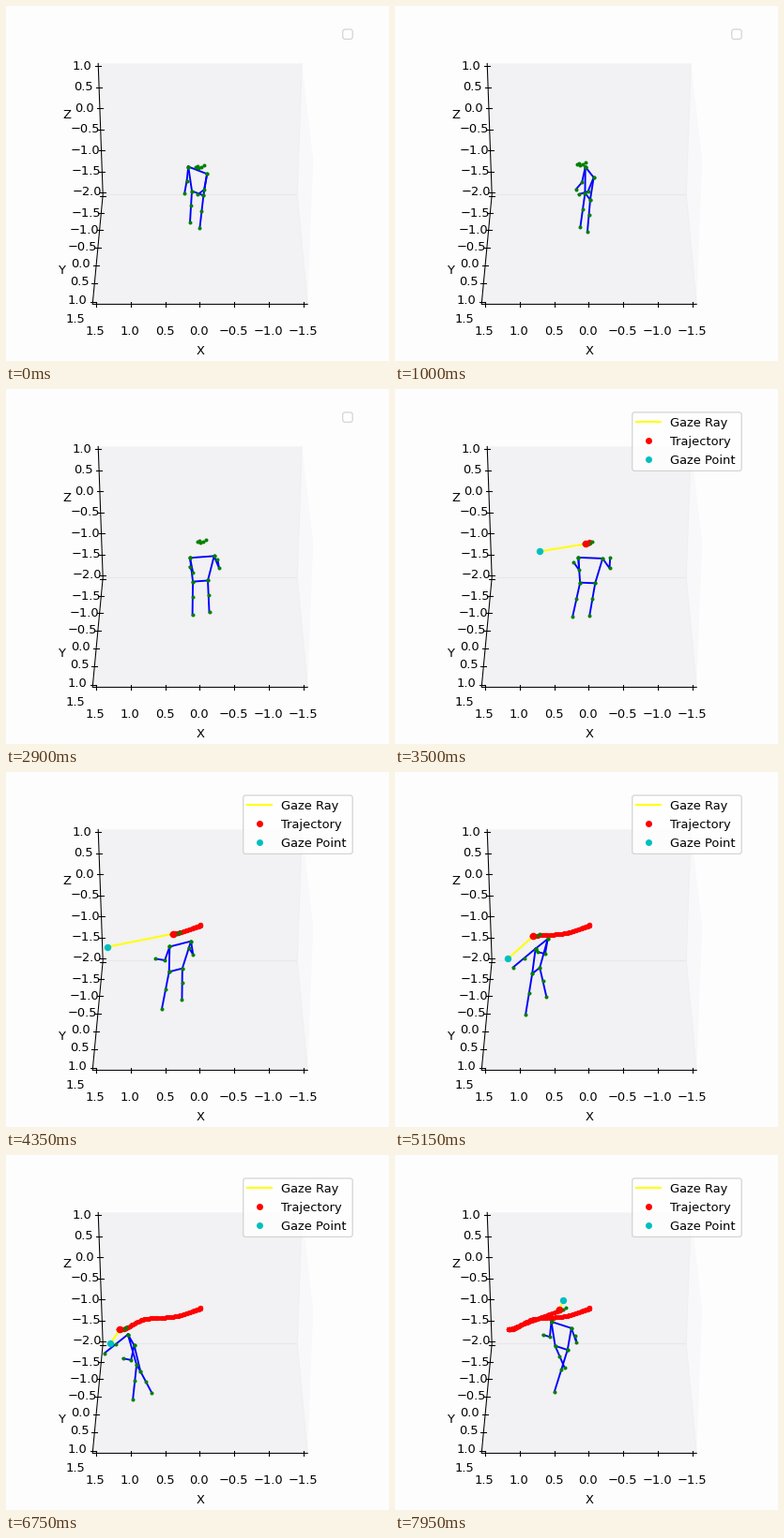
Write a matplotlib script that moves like this. It is 408x379 px and loops after 8000 ms.

```python
import numpy as np
import matplotlib.pyplot as plt
from matplotlib.animation import FuncAnimation
from matplotlib.patches import FancyBboxPatch, Polygon

W, H = 408, 379
STEP, FRAMES = 50, 160
PX = 0.72                      # points per pixel at 100 dpi
GAZE_ON = 3000

plt.rcParams["font.family"] = "DejaVu Sans"
fig = plt.figure(figsize=(W / 100, H / 100), dpi=100, facecolor="#fefdfe")
ax = fig.add_axes([0, 0, 1, 1])
ax.set_xlim(0.8, W + 0.8)
ax.set_ylim(H + 0.6, 0.6)
ax.axis("off")


def label(x, y, text, ha="center", **kw):
    return ax.text(x, y + 4.7, text, ha=ha, va="baseline",
                   fontsize=13 * PX, color="black", **kw)


def stroke(points, color="black", width=1.05, z=2):
    xs, ys = zip(*points)
    return ax.plot(xs, ys, color=color, lw=width * PX, zorder=z)[0]


def dots(color, size, z, points=((), ())):
    return ax.plot(*points, "o", color=color, ms=size * PX, mew=0, zorder=z)[0]


def frame_box(x0, y0, x1, y1):
    box = FancyBboxPatch((x0, y0), x1 - x0, y1 - y0,
                         boxstyle="round,pad=0,rounding_size=2.6",
                         fc=(1, 1, 1, 0.8), ec=(0.8, 0.8, 0.8, 0.8),
                         lw=1.3 * PX, zorder=20)
    return ax.add_patch(box)


def number(v):
    return f"{v:.1f}".replace("-", "\u2212")


def draw_axes():
    tl, tr, ml, mr = (99, 62), (316, 62), (104, 202), (311, 202)
    bl, br, side = (93, 319), (322, 319), (328, 165)
    panes = [((tr, side, br, mr), "#f8f7f9"),
             ((tl, tr, mr, ml), "#f2f1f3"),
             ((ml, mr, br, bl), "#f2f1f3")]
    for pts, color in panes:
        ax.add_patch(Polygon(pts, fc=color, ec="none", zorder=1))
    stroke([ml, mr], "#e8e8e9")
    stroke([tr, mr, br], "#efeff0")
    stroke([tl, ml, bl, br])

    for i in range(7):
        x = 96.5 + 36.9 * i
        stroke([(x, 317), (x, 322)])
        label(x - 0.5, 347, number(1.5 - 0.5 * i))

        x, y = 99.2 + 0.8 * i, 65 + 22.5 * i
        stroke([(x - 3, y), (x + 3, y)])
        label(82 + 0.92 * i, 63.8 + 22.4 * i, number(1 - 0.5 * i))

        x, y = 103.8 - 1.75 * i, 204 + 17.4 * i + 0.22 * i * i
        stroke([(x - 3, y), (x + 3, y)])
        label(86.2 - 1.85 * i, y + 17.2, number(-1.5 + 0.5 * i))

    label(208, 367.5, "X")
    label(61, 281.5, "Y")
    label(66, 115.5, "Z")


def draw_legend():
    items = [frame_box(253.5, 25.5, 370, 88),
             stroke([(258, 36), (284, 36)], "yellow", 2, 21),
             dots("red", 7, 21, ([271], [56])),
             dots("c", 7, 21, ([271], [76]))]
    for i, text in enumerate(("Gaze Ray", "Trajectory", "Gaze Point")):
        items.append(label(294, 35.6 + 19.9 * i, text, "left", zorder=21))
    return items


def spline(times, values):
    """Smooth curve through timed values that never overshoots a turn."""
    times = np.array(times, float)
    values = np.array(values, float)
    slopes = np.gradient(values, times, axis=0)
    rise = np.diff(values, axis=0)
    slopes[1:-1][rise[1:] * rise[:-1] <= 0] = 0

    def at(t):
        i = int(np.clip(np.searchsorted(times, t, "right") - 1,
                        0, len(times) - 2))
        span = times[i + 1] - times[i]
        u = (t - times[i]) / span
        a, b = values[i], values[i + 1]
        return ((1 + 2 * u) * (1 - u) ** 2 * a + u * u * (3 - 2 * u) * b
                + span * u * (1 - u) * ((1 - u) * slopes[i] - u * slopes[i + 1]))
    return at


head = spline(
    [0, 1000, 2250, 3000, 3500, 4300, 5150, 6100, 6750, 7500, 7950],
    [(205, 173), (197, 170), (187, 166), (208, 164), (204, 166), (181, 173),
     (148, 176), (125, 187), (122, 187), (152, 176), (176, 166)])
gaze = spline(
    [3000, 3500, 4650, 5150, 6750, 7950],
    [(39, 186), (155, 174), (99, 193), (121, 200), (112, 202), (180, 156)])

# The body is posed by a few tracks sharing the same key times.
KEYS = [0, 1000, 2250, 3500, 5150, 6750, 7950]
turn = spline(KEYS, [40, 70, -25, 5, -60, 75, 35])
lean = spline(KEYS, [0, -2, -1, -3, -6, 8, 0])
stride = spline(KEYS, [-1, 1, 1, 1, 7, 8, -12])
feet = spline(KEYS, [-3, -4, 9, -7, 0, 4, -2])
neck = spline(KEYS, [(0, 3), (11, 8), (1, 16), (5, 15), (9, 8), (12, 11), (2, 16)])
hand = spline(KEYS, [(-4, 28), (-10, 24), (2, 17), (-5, 5),
                     (-24, 20), (-25, 20), (-9, 14)])
hand_gap = spline([0, 2250, 3500, 7950], [-6, -6, 13, 13])

FACE = np.array([(-2, 0), (0, -1), (1, 1), (4, 0), (7, -2)])
ARM = 14.2


def limbs(t):
    """Arm, arm, leg, leg and trunk as chains of points."""
    angle = np.radians(turn(t))
    across = np.array([13 * np.cos(angle), 6 * np.sin(angle)])
    chest = head(t) + neck(t)
    pelvis = chest + (lean(t), 24.5 + 0.7 * abs(lean(t)))
    ground = pelvis + (feet(t), 34 - 0.5 * lean(t))
    spread = 0.62 * across + stride(t) * np.array([1, -0.9])

    arms, legs = [], []
    for side in (-1, 1):
        shoulder = chest + side * across
        reach = hand(t) + (side > 0) * np.array([hand_gap(t), -6])
        bend = np.sqrt(max(0, ARM ** 2 - reach @ reach / 4))
        elbow = shoulder + reach / 2 + bend * np.array([0.25, 0.8])
        arms.append([shoulder, elbow, shoulder + reach])

        hip = pelvis + side * 0.62 * across
        ankle = ground + side * spread
        legs.append([hip, hip + 0.47 * (ankle - hip), ankle])
    trunk = [arms[0][0], arms[1][0], legs[1][0], legs[0][0], arms[0][0]]
    return [np.array(chain) for chain in (*arms, *legs, trunk)]


trail = np.array([head(t) for t in range(GAZE_ON, STEP * FRAMES, STEP)])

draw_axes()
empty_box = frame_box(359.5, 25.5, 370, 36)
legend = draw_legend()
ray = stroke([(0, 0)], "yellow", 2, 4)
path = dots("red", 5.2, 5)
bones = [stroke([(0, 0)], "blue", 1.9, 6) for _ in range(5)]
joints = dots("green", 4, 7)
now = dots("red", 7.6, 8)
target = dots("c", 7.4, 9)
gaze_parts = legend + [ray, path, now, target]


def update(frame):
    t = frame * STEP
    eye = head(t)
    chains = limbs(t)
    for line, chain in zip(bones, chains):
        line.set_data(*chain.T)
    joints.set_data(*np.vstack([*chains, eye + FACE]).T)

    tracking = t >= GAZE_ON
    empty_box.set_visible(not tracking)
    for part in gaze_parts:
        part.set_visible(tracking)
    if tracking:
        point = gaze(t)
        ray.set_data(*np.array([eye, point]).T)
        path.set_data(*trail[:(t - GAZE_ON) // STEP + 1].T)
        now.set_data(*eye[:, None])
        target.set_data(*point[:, None])
    return [empty_box, joints, *bones, *gaze_parts]


anim = FuncAnimation(fig, update, frames=FRAMES, interval=STEP,
                     repeat=True, repeat_delay=0, blit=False)
plt.show()
```
